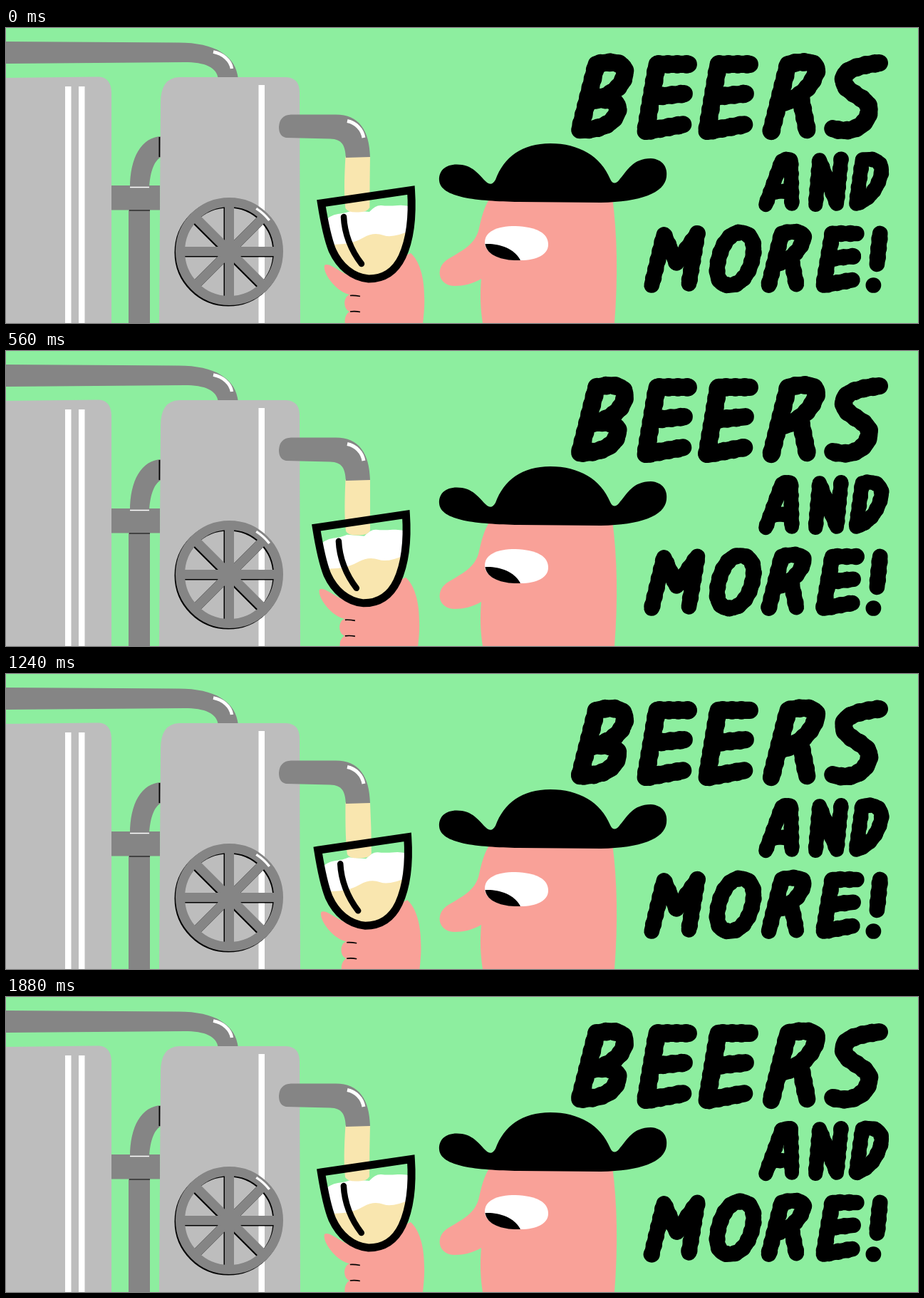
These frames come from a looping animation (1280x414 px, 1.92 s). An HTML page with a canvas:

```html
<!DOCTYPE html>
<html lang="en">
<head>
<meta charset="utf-8">
<title>Beers and more!</title>
<style>
  html, body { margin: 0; width: 100%; height: 100%; overflow: hidden; background: #8dee9f; }
  canvas { display: block; width: 100%; height: 100%; }
</style>
</head>
<body>
<canvas id="stage" width="1280" height="414" role="img" aria-label="BEERS AND MORE!"></canvas>
<script>
const ctx = document.getElementById('stage').getContext('2d');
const LOOP = 1920, STEP = 40, SWAY = 960;
const GREEN = '#8dee9f', TANK = '#bdbdbd', PIPE = '#858585';
const SKIN = '#f9a198', BEER = '#f9e6af', BLACK = '#000', WHITE = '#fff';

function fill(d, color) {
  ctx.fillStyle = color;
  ctx.fill(new Path2D(d));
}

function line(d, color, width, cap = 'butt') {
  ctx.strokeStyle = color;
  ctx.lineWidth = width;
  ctx.lineCap = cap;
  ctx.stroke(new Path2D(d));
}

function box(x, y, w, h, color) {
  ctx.fillStyle = color;
  ctx.fillRect(x, y, w, h);
}

function moved(dx, dy, paint) {
  ctx.save();
  ctx.translate(dx, dy);
  paint();
  ctx.restore();
}

// --- Brewery ---

function wheelShape(color) {
  ctx.strokeStyle = color;
  ctx.lineCap = 'butt';
  ctx.lineWidth = 13;
  ctx.beginPath();
  ctx.arc(0, 0, 69, 0, Math.PI * 2);
  for (let i = 0; i < 4; i++) {
    const c = Math.cos(i * Math.PI / 4) * 66, s = Math.sin(i * Math.PI / 4) * 66;
    ctx.moveTo(-c, -s);
    ctx.lineTo(c, s);
  }
  ctx.stroke();
}

function wheel() {
  moved(312, 315, () => wheelShape(BLACK));
  moved(313.5, 313.5, () => {
    wheelShape(PIPE);
    ctx.strokeStyle = WHITE;
    ctx.lineWidth = 3.5;
    ctx.beginPath();
    ctx.arc(0, 0, 71, -1.01, -0.66);
    ctx.stroke();
  });
}

function brewery() {
  fill('M0 19L240 20.5C292 20 323 38 326 72H298C296 55 280 48 250 48L0 50Z', PIPE);
  line('M291 33.5C304 36 315 45 317 57', WHITE, 4.5);

  box(172, 250, 30, 164, PIPE);
  fill('M174 224C174 182 190 153 218 152V181C207 186 202 205 201 224Z', PIPE);
  box(148, 221, 68, 34.5, PIPE);
  line('M174 223.5H201', WHITE, 1.5);
  line('M173 256H202', BLACK, 1);
  line('M215.5 153V181', BLACK, 2);

  fill('M0 70L128 68.5Q147 68 148 90V414H0Z', TANK);
  fill('M243 69L393 69Q412 70 412 90L413 414H215L217 105Q217 70 243 69Z', TANK);
  for (const x of [83, 102, 354.5]) box(x, x < 200 ? 82 : 80, 8.5, 334, WHITE);
  wheel();
}

function spout() {
  fill('M400 121.5H462C495 121 510 143 511 181L477 182C476 165 472 156 455 155.5L393 154Q383 152 383 139Q384 122 400 121.5Z', PIPE);
  line('M479 130.5C491 133 500 142 502 154', WHITE, 5);
}

// --- Man ---

function man() {
  fill('M680 238H851C858 290 859 350 854 414H669C666 395 665 375 667 352C655 359 642 362 630 362C607 362 602 338 618 326C636 314 656 307 663 285C667 268 670 252 680 238Z', SKIN);
  fill('M608 214C607 198 620 189 640 192C660 195 668 213 677 218C681 220 684 218 687 213C699 181 724 162 764 162C804 162 835 180 848 212C851 219 856 219 860 214C872 200 880 183 905 183C922 184 929 196 927 209C924 232 890 244 835 245L720 244C660 243 610 238 608 214Z', BLACK);
  fill('M672 301C672 286 688 278 715 278C745 279 761 288 761 304C761 318 745 326 722 326C695 326 672 318 672 301Z', WHITE);
  fill('M672.5 303C690 302 713 308 722 326C700 327 675 321 672.5 303Z', BLACK);
}

// --- Glass in hand, with the pouring beer ---

const GLASS = 'M442.5 246L568.5 227.5C571 265 567 297 556 321C546 342 530 352 509 352C486 350 468 334 458 312C450 292 446 268 442.5 246Z';

function hand() {
  fill('M447 333C455 328 468 345 490 350L568 316C580 326 587 350 587 375C588 392 586 405 584 425H479C474 414 474 404 482 398C473 394 473 378 482 374C465 371 444 345 447 333Z', SKIN);
  line('M483 375.5Q489 375 497 376.5M483 398Q490 397 497 398.5', BLACK, 1.6);
}

function drink() {
  ctx.save();
  ctx.clip(new Path2D(GLASS));
  fill('M444 274Q455 262 466 261T486 256L510 258Q519 248 527 249T550 249T575 254V360H444Z', WHITE);
  fill('M444 305Q460 304 474 303T502 294T530 291T575 281V360H444Z', BEER);
  ctx.restore();
}

function stream(bend) {
  const l = 475 + bend, r = 510 + bend;
  fill(`M476.5 180H511Q${r} 215 ${r} 252Q${r - 4} 259 ${r - 17} 258.5Q${l + 4} 259 ${l + 1} 253Q${l - 2} 230 476.5 180Z`, BEER);
}

function pour(angle) {
  const away = 1 - Math.cos(angle), dx = -3.8 * away, dy = away;
  moved(dx, dy, () => { hand(); drink(); });
  stream(1.2 + 1.7 * Math.cos(angle - 2.03));
  moved(dx, dy, () => {
    ctx.lineJoin = 'miter';
    line(GLASS, BLACK, 11);
    line('M474 265C475 288 484 312 499 331', BLACK, 8.5, 'round');
  });
}

// --- Brush lettering: leaning pen strokes with a restless edge ---

const LEAN = 0.17;
const STROKES = {
  A: 'M-17 100L2 4Q20 -4 22 4L40 98M-10 72L34 70',
  B: 'M-8 98L0 2C32 -6 48 4 43 24C39 40 22 52 0 55C32 50 46 58 42 74C38 92 16 98 -8 98',
  D: 'M3 98L0 2C34 -6 50 14 46 38C42 70 26 90 3 98',
  E: 'M46 2H0V100L53 90M0 50L47 45',
  M: 'M-7 100L0 4L33 58L63 2V97',
  N: 'M8 100L0 2L54 98L47 0',
  O: 'M34 0C58 0 68 24 66 50C64 82 50 100 32 100C8 100 0 78 2 50C4 20 16 0 34 0Z',
  R: 'M-8 100L0 2C32 -6 48 2 42 18C38 38 22 52 4 58M27 52L44 98',
  S: 'M52 0C20 4 0 10 4 26C8 46 50 50 49 72C48 94 26 104 0 96',
  '!': 'M0 2L4 60M4 100h.1'
};

function word(text, xs, y, scale, pen) {
  return [...text].map((ch, i) => {
    const path = new Path2D();
    path.addPath(new Path2D(STROKES[ch]),
      new DOMMatrix([scale, 0, -LEAN * scale, scale, xs[i], y]));
    return { path, pen };
  });
}

const letters = [
  ...word('BEERS', [829, 914, 1000, 1098, 1176], 49, 0.96, 25),
  ...word('AND', [1088, 1142, 1202], 184, 0.64, 21),
  ...word('MORE!', [924, 1005, 1089, 1160, 1227], 287, 0.74, 22.5)
];

function random(seed) {
  const v = Math.sin(seed * 127.1) * 43758.5453;
  return v - Math.floor(v);
}

function lettering(step) {
  ctx.strokeStyle = BLACK;
  ctx.lineCap = ctx.lineJoin = 'round';
  letters.forEach(({ path, pen }, i) => {
    ctx.lineWidth = pen - 0.8;
    ctx.stroke(path);
    // Spaced dabs of a wider pen roughen the edge.
    ctx.lineWidth = pen + 0.8;
    ctx.setLineDash([0.1, 13]);
    ctx.lineDashOffset = 13 * random(step * 20 + i + 1);
    ctx.stroke(path);
    ctx.setLineDash([]);
  });
}

function draw(time) {
  const step = Math.floor(time % LOOP / STEP);
  box(0, 0, 1280, 414, GREEN);
  brewery();
  pour(step * STEP / SWAY * Math.PI * 2);
  spout();
  man();
  lettering(step);
}

const start = performance.now();
function tick() {
  draw(performance.now() - start);
  requestAnimationFrame(tick);
}
tick();
</script>
</body>
</html>
```
